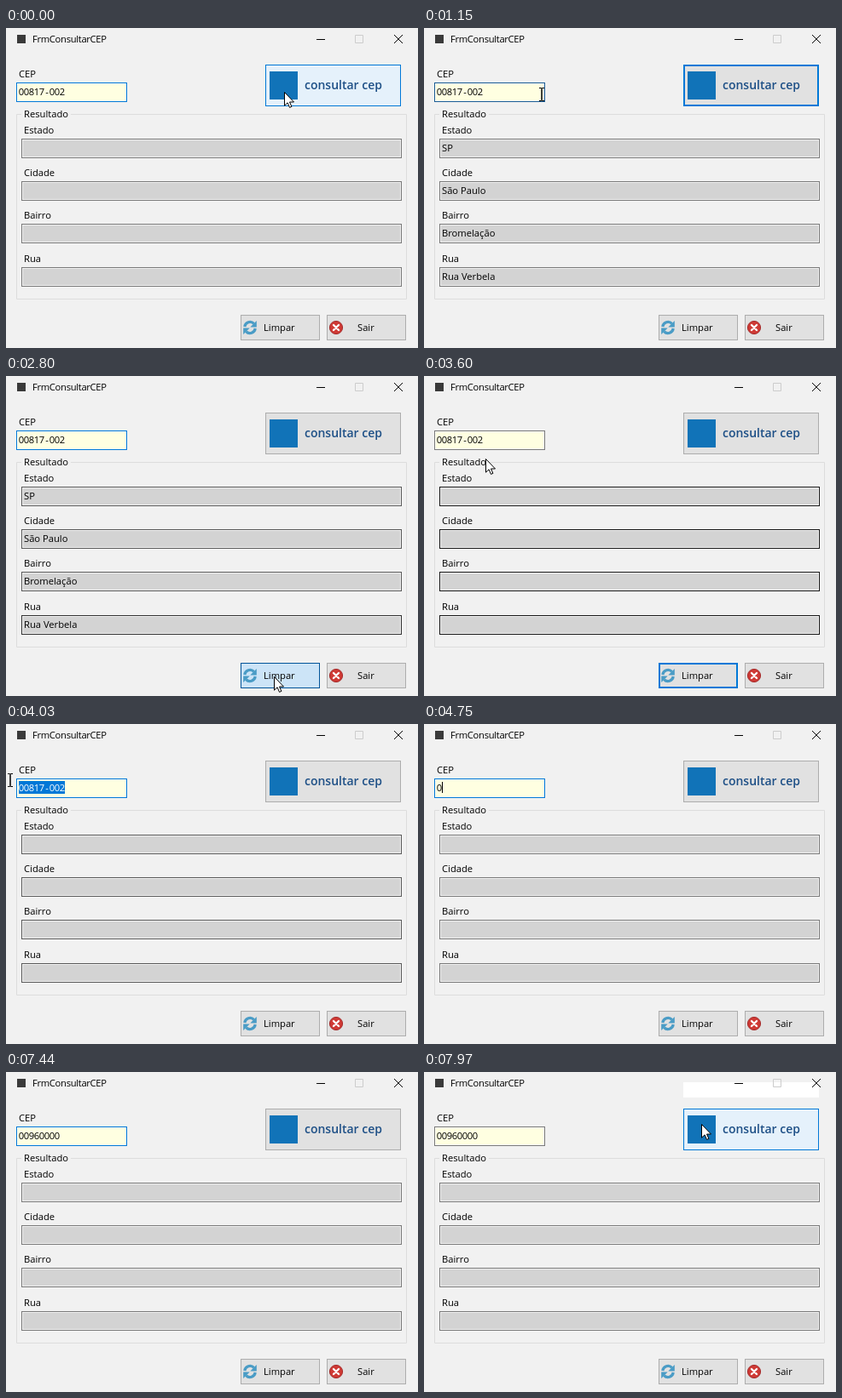
Write an HTML page that moves like this. It is 483 px wide and 376 px high and loops after 8000 ms.

```html
<!DOCTYPE html>
<html lang="pt-BR">
<head>
<meta charset="utf-8">
<title>FrmConsultarCEP</title>
<style>
  html, body { margin: 0; width: 100%; height: 100%; overflow: hidden; background: #f1f1f1; }
  svg { display: block; width: 483px; height: 376px; }
  text { font: 11.2px "Open Sans", "Noto Sans", sans-serif; fill: #000; }
  .title { letter-spacing: -.3px; }
  .label { font-size: 14px; font-weight: 600; fill: #1d4f86; }
  .line { fill: none; stroke: #000; }
  .rim, .inner { fill: none; }
  .btn .rim { fill: #e1e1e1; stroke: #adadad; }
  .btn.hot .rim { fill: #e5f1fb; stroke: #0078d7; }
  .btn.down .rim { fill: #cce4f7; stroke: #005499; }
  .btn.focus .rim, .btn.focus .inner { stroke: #0078d7; }
  .field .rim { fill: #d3d3d3; stroke: #7a7a7a; }
  .field .inner { stroke: #f0f0f0; }
  .code .rim { fill: #ffffe1; }
  .code .inner { stroke: #fffff4; }
  #code { text-anchor: middle; }
  #code .on { fill: #fff; }
</style>
</head>
<body>
<svg id="stage" viewBox="0 0 483 376">
  <rect id="band" x="304" y="12" width="159" height="18" fill="#fff"/>
  <rect x="13" y="8" width="10" height="10" fill="#3a3a3a"/>
  <text class="title" x="31" y="17">FrmConsultarCEP</text>
  <path class="line" d="M364 13.5h10"/>
  <path class="line" d="M409.5 8.5h9v9h-9z" style="stroke:#ccc"/>
  <path class="line" d="M455 8l10 10m0-10l-10 10"/>
  <path class="line" d="M18 101.5H12.5V318.5H469.5V101.5H76" style="stroke:#dcdcdc"/>
  <text x="15" y="58">CEP</text>
  <text x="21" y="105">Resultado</text>
  <g id="form"></g>
  <rect id="mark" x="309" y="51" width="33" height="33" fill="#1173b8"/>
  <text class="label" x="350" y="72">consultar cep</text>
  <rect id="range" y="67" height="15" fill="#0078d7"/>
  <text id="code" y="79"></text>
  <path id="caret" class="line" d="M.5 68v13"/>
  <g fill="none" stroke="#4a9cc6" stroke-width="3.2">
    <path d="M279.8 351a6.3 6.3 0 0 1 10.8-3.6"/>
    <path d="M292.2 353a6.3 6.3 0 0 1-10.8 3.6"/>
  </g>
  <path d="M293.8 344v7.5h-7.5zM278.2 360v-7.5h7.5z" fill="#4a9cc6"/>
  <text x="302" y="356">Limpar</text>
  <circle cx="387" cy="352" r="7.6" fill="#cf3a35" stroke="#a52b2b"/>
  <path d="M384 349l6 6m0-6l-6 6" stroke="#fff" stroke-width="2.4" stroke-linecap="round"/>
  <text x="412" y="356">Sair</text>
  <path id="arrow" d="M.5 .5V16.2L4.1 12.8 6.5 18.4 8.9 17.4 6.5 12H11.5Z" fill="#fff" stroke="#000"/>
  <path id="beam" class="line" d="M-3-7.5h2.5q.5 0 .5 1V6.5q0 1-.5 1H-3M3-7.5H.5Q0-7.5 0-6.5V6.5q0 1 .5 1H3"/>
</svg>
<script>
const $ = id => document.getElementById(id);
const LOOP = 8000, CELL = 6, LEFT = 15;
const FIRST = '00817-002', NEXT = '00960000';
const GRAY = '#7a7a7a', BLUE = '#0078d7', DARK = '#171717';

const box = (id, cls, x, y, w, h) => `<g id="${id}" class="${cls}">
  <rect class="rim" x="${x + .5}" y="${y + .5}" width="${w - 1}" height="${h - 1}"/>
  <rect class="inner" x="${x + 1.5}" y="${y + 1.5}" width="${w - 3}" height="${h - 3}"/></g>`;

const rows = [
  ['Estado', 'SP', 130], ['Cidade', 'São Paulo', 180],
  ['Bairro', 'Bromelação', 230], ['Rua', 'Rua Verbela', 281]
];
$('form').innerHTML =
  box('cep', 'field code', 12, 64, 130, 23) +
  box('go', 'btn', 304, 43, 159, 49) +
  box('wipe', 'btn', 275, 337, 93, 30) +
  box('quit', 'btn', 376, 337, 93, 30) +
  rows.map(([name, value, y], i) => `<text x="21" y="${y - 6}">${name}</text>` +
    box('row' + i, 'field', 18, y, 446, 23) +
    `<text class="value" x="21" y="${y + 15}">${value}</text>`).join('');

const arrow = (x, y) => ({ kind: 'arrow', x, y });
const beam = (x, y) => ({ kind: 'beam', x, y });
const rims = (top, last = top) => [top, top, top, last];

// Each step changes part of the state from its time on
const steps = [
  [0, { cursor: arrow(326, 75), code: FIRST, sel: [0, 0], caret: false, cep: BLUE,
        go: 'hot', wipe: '', rims: rims(GRAY), filled: false, band: false }],
  [150, { cursor: arrow(300, 80) }],
  [300, { cursor: arrow(262, 92) }],
  [450, { cursor: arrow(220, 101), go: 'focus', cep: GRAY }],
  [580, { cursor: arrow(172, 108), filled: true }],
  [730, { cursor: arrow(150, 94) }],
  [850, { cursor: arrow(140, 86) }],
  [1000, { cursor: beam(138, 78), cep: DARK }],
  [1150, { cep: '#1a5c94' }],
  [1270, { go: '' }],
  [1420, { cep: BLUE }],
  [1850, { cursor: beam(64, 73), sel: [8, 9] }],
  [1980, { cursor: beam(47, 70), sel: [5, 9] }],
  [2280, { cursor: arrow(292, 258), rims: rims(DARK, GRAY) }],
  [2400, { cursor: arrow(300, 292), rims: rims(DARK) }],
  [2530, { cursor: arrow(309, 330), rims: rims('#333', DARK) }],
  [2650, { cursor: arrow(314, 351), wipe: 'hot' }],
  [2800, { cursor: arrow(314, 353), wipe: 'down', sel: [0, 0], rims: rims('#5a5a5a', '#333') }],
  [2930, { cep: GRAY, rims: rims(GRAY) }],
  [3080, { filled: false, wipe: 'hot' }],
  [3480, { cursor: arrow(150, 190), wipe: 'focus', rims: rims(DARK) }],
  [3600, { cursor: arrow(72, 97) }],
  [3750, { cursor: beam(72, 78), cep: DARK, wipe: '' }],
  [3880, { cep: BLUE, rims: rims('#333') }],
  [4030, { cursor: beam(5, 66), sel: [0, 9], rims: rims('#5a5a5a') }],
  [4160, { cursor: null, rims: rims(GRAY) }],
  ...[4750, 5200, 5330, 5480, 5760, 6190, 6470, 6910].map((t, i) =>
    [t, { code: NEXT.slice(0, i + 1), sel: [0, 0], caret: true }]),
  [7440, { caret: false }],
  [7560, { cursor: arrow(308, 12) }],
  [7700, { cursor: arrow(319, 42), go: 'hot', band: true }],
  [7850, { cursor: arrow(325, 58) }],
  [7970, { cursor: arrow(325, 61), cep: GRAY }]
];

const show = (el, on) => { el.style.display = on ? '' : 'none'; };
const rim = (id, color) => { $(id).firstElementChild.style.stroke = color; };

function draw(s) {
  const [from, to] = s.sel;
  $('code').innerHTML = [...s.code].map((c, i) =>
    `<tspan x="${LEFT + CELL * (i + .5)}" class="${i >= from && i < to ? 'on' : ''}">${c}</tspan>`).join('');
  $('range').setAttribute('x', LEFT + CELL * from);
  $('range').setAttribute('width', CELL * (to - from));
  $('caret').setAttribute('transform', `translate(${LEFT + CELL * s.code.length})`);
  show($('caret'), s.caret);
  show($('band'), s.band);
  document.querySelectorAll('.value').forEach(el => show(el, s.filled));
  $('go').setAttribute('class', 'btn ' + s.go);
  $('wipe').setAttribute('class', 'btn ' + s.wipe);
  rim('cep', s.cep);
  s.rims.forEach((color, i) => rim('row' + i, color));
  for (const kind of ['arrow', 'beam']) {
    const on = s.cursor && s.cursor.kind === kind;
    show($(kind), on);
    if (on) $(kind).setAttribute('transform', `translate(${s.cursor.x} ${s.cursor.y})`);
  }
}

let start, shown = 0;
function tick() {
  const now = performance.now();
  start ??= now;
  const t = (now - start) % LOOP;
  const past = steps.filter(([at]) => at <= t);
  if (past.length !== shown) {
    shown = past.length;
    draw(Object.assign({}, ...past.map(([, change]) => change)));
  }
  requestAnimationFrame(tick);
}
tick();
</script>
</body>
</html>
```
